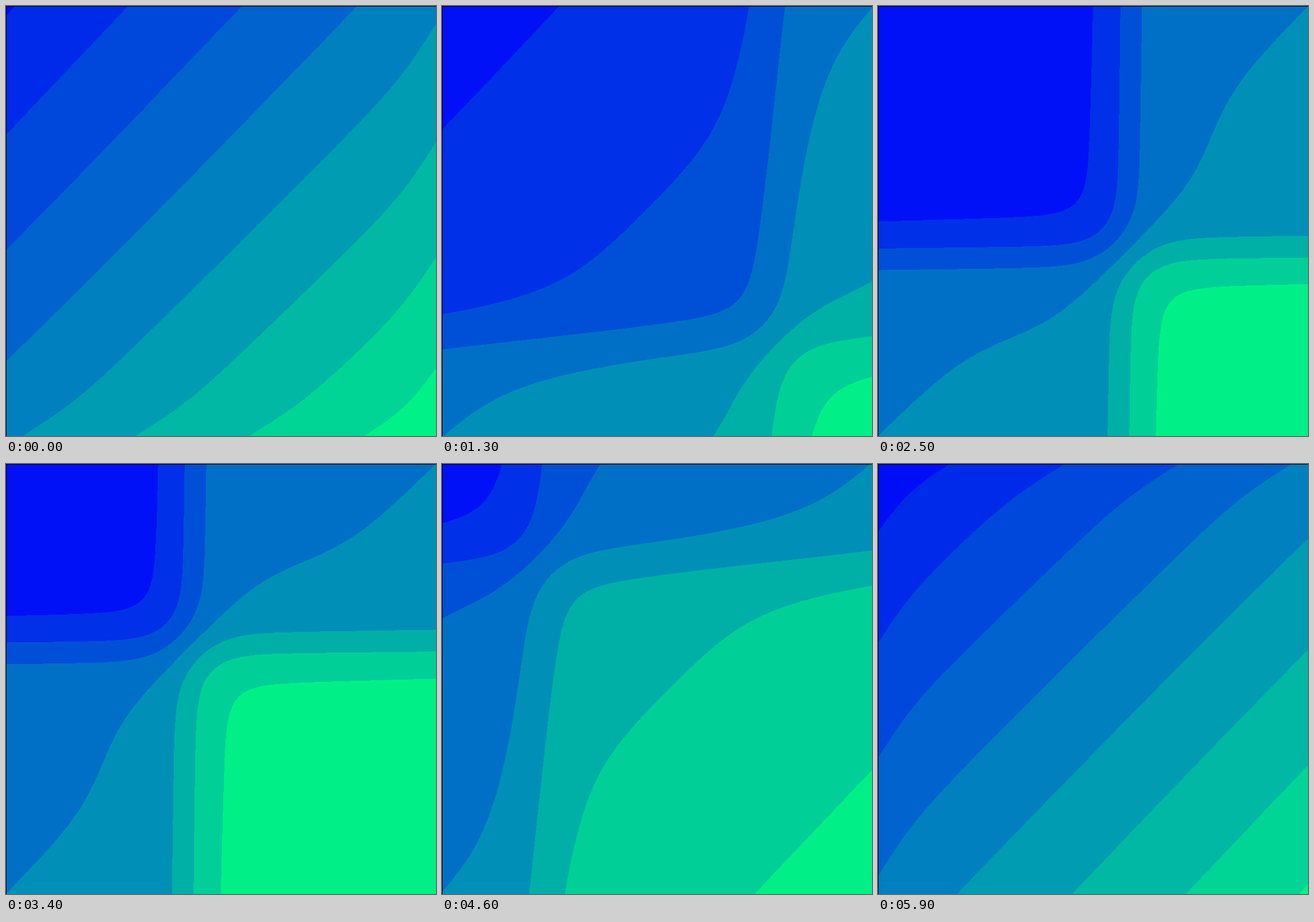
Write an HTML page with a canvas that moves like this. It is 748 by 748 pixels and loops after 6 s.

```html
<!DOCTYPE html>
<html lang="en">
<head>
<meta charset="utf-8">
<title>Contour bands</title>
<style>
html, body { margin: 0; width: 100%; height: 100%; overflow: hidden; background: #000; }
canvas { display: block; }
</style>
</head>
<body>
<canvas id="stage" width="748" height="748"></canvas>
<script>
const SIZE = 748, HALF = SIZE / 2;
const STEPS = 60, STEP_MS = 100;
const WIDTH = 59.5;   // width of the travelling front
const UNIT = 199;     // contour interval of 1, in pixels of plain slope
const NICE = [1, 1.5, 2, 2.5, 3, 4, 5, 6, 8, 10];

const ctx = document.getElementById('stage').getContext('2d');
const image = ctx.createImageData(SIZE, SIZE);
const pixels = new Uint32Array(image.data.buffer);
const BLACK = 0xff000000;

// Smallest round interval that splits the range into at most eight parts
function interval(range) {
  const raw = range / 8 / UNIT;
  const power = 10 ** Math.floor(Math.log10(raw));
  return NICE.find(n => n * power >= raw) * power * UNIT;
}

// Blue to green, packed as ABGR
function bandColor(v) {
  const green = Math.floor(v * 256);
  const blue = Math.round(255 - green / 2);
  return (BLACK | blue << 16 | green << 8) >>> 0;
}

// Slope plus front along one axis
function profile(center, height, bend) {
  return Float64Array.from({ length: SIZE }, (_, i) => {
    const p = i + 0.5;
    return p - HALF + bend * Math.sin(Math.PI * p / SIZE)
      + height * Math.tanh((p - center) / WIDTH);
  });
}

function draw(step) {
  const phase = step - (STEPS - 1) / 2;
  const center = HALF - 12.5 * phase;
  const height = 7250 / Math.cosh(0.207 * phase);
  const side = -Math.sign(phase);
  const gx = profile(center, height, 4 * side);
  const gy = profile(center, height, -10 * side);

  const min = gx[0] + gy[0], max = gx[SIZE - 1] + gy[SIZE - 1];
  const gap = interval(max - min);
  const low = Math.floor(min / gap);
  const count = Math.ceil(max / gap) - low;
  const colors = Array.from({ length: count }, (_, k) => bandColor((k + 0.5) / count));

  pixels.fill(BLACK);
  for (let y = 1; y < SIZE; y++) {
    for (let x = 1; x < SIZE; x++) {
      const band = Math.floor((gx[x] + gy[y]) / gap) - low;
      pixels[y * SIZE + x] = colors[Math.max(0, Math.min(count - 1, band))];
    }
  }
  ctx.putImageData(image, 0, 0);
}

const start = performance.now();
let shown = -1;
function tick() {
  const step = Math.floor((performance.now() - start) / STEP_MS) % STEPS;
  if (step !== shown) draw(shown = step);
  requestAnimationFrame(tick);
}
tick();
</script>
</body>
</html>
```
